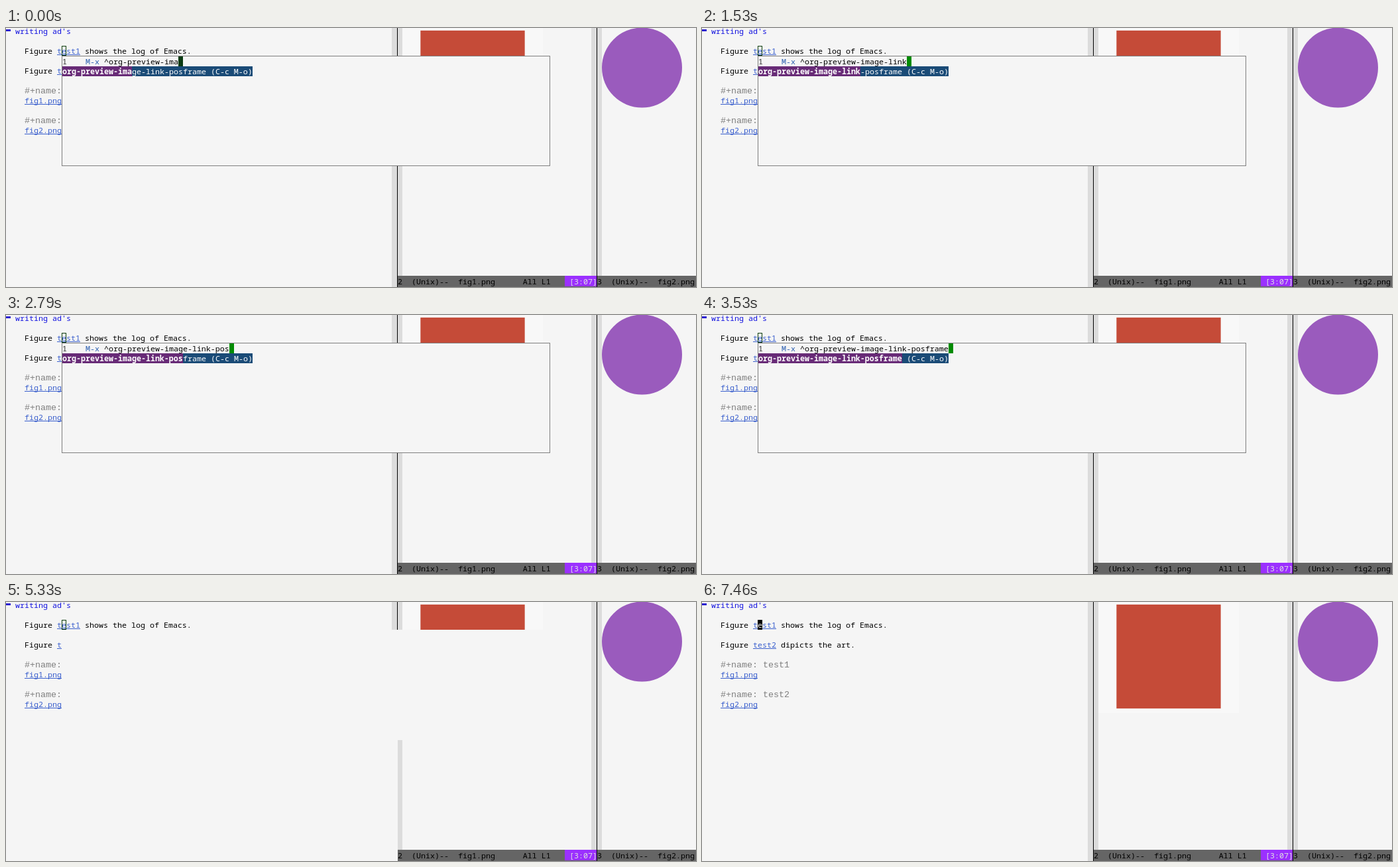
An HTML page with a canvas for the animation above (8000 ms loop, 1041 px wide and 392 px high).

```html
<!DOCTYPE html>
<html lang="en">
<head>
<meta charset="utf-8">
<title>Image link preview</title>
<style>
html, body { margin: 0; width: 100%; height: 100%; overflow: hidden; background: #f5f5f5; }
canvas { display: block; width: 1041px; height: 392px; }
</style>
</head>
<body>
<canvas id="stage" width="1041" height="392"></canvas>
<script>
const ctx = document.getElementById('stage').getContext('2d');
const LOOP = 8000, CELL = 7;
const PAPER = '#f5f5f5', FRINGE = '#dcdcdc', LINK = '#3a5fcd', RED = '#c54b38';
const MONO = '11.667px "Noto Sans Mono", monospace';
const WIDE = '13.333px "Liberation Mono", monospace';

const COMMAND = 'org-preview-image-link-posframe';
const START_CHARS = 15;
const KEY_TIMES = [200, 270, 530, 1060, 1200, 1400, 1530, 1930, 2200, 2330, 2790,
                   3060, 3190, 3330, 3430, 3530];
const PROMPT_CLOSED = 4920, FRAME_OPEN = 5330, IMAGE_SHOWN = 5670, FRAME_CLOSED = 7460;

function rect(x, y, w, h, color) {
  ctx.fillStyle = color;
  ctx.fillRect(x, y, w, h);
}

function text(str, x, y, color = '#000', font = MONO) {
  ctx.font = font;
  ctx.fillStyle = color;
  ctx.fillText(str, x, y);
}

function outline(x, y, w, h, color) {
  ctx.strokeStyle = color;
  ctx.lineWidth = 1;
  ctx.strokeRect(x + 0.5, y + 0.5, w - 1, h - 1);
}

function link(str, x, y) {
  text(str, x, y, LINK);
  rect(x, y + 1, str.length * CELL, 1, LINK);
}

// Picture tile with a plain square standing for the artwork
function tile(x, y, w, h) {
  rect(x, y, w, h, '#f8f8f8');
  const side = h * 0.92;
  rect(x + (w - side) / 2, y + (h - side) / 2, side, side, RED);
}

function drawDocument(focused) {
  rect(0, 2, 7, 3, '#2a1fd0');
  text("writing ad's", 14, 9, '#1414e0');

  text('Figure', 28, 39);
  link('test1', 77, 39);
  text('shows the log of Emacs.', 119, 39);
  text('Figure', 28, 69);
  link('test2', 77, 69);
  text('dipicts the art.', 119, 69);

  for (const n of [1, 2]) {
    const y = 54 + n * 45;
    text('#+name: test' + n, 28, y, '#7f7f7f', WIDE);
    link(`fig${n}.png`, 28, y + 15);
  }

  if (focused) {
    rect(84, 27, 7, 15, '#000');
    text('e', 84, 39, PAPER);
  } else {
    outline(84, 27, 7, 15, '#0b3d0b');
  }
}

function drawDivider(x) {
  rect(x - 8, 0, 16, 392, FRINGE);
  rect(x, 0, 1, 392, '#000');
}

function drawPanes() {
  drawDivider(590);
  drawDivider(891);
  tile(598, -3, 212, 171);

  ctx.fillStyle = '#9a5bbd';
  ctx.beginPath();
  ctx.arc(959.5, 60, 60.5, 0, Math.PI * 2);
  ctx.fill();

  rect(591, 375, 450, 17, '#656565');
  text('2  (Unix)--  fig1.png      All L1', 591, 388);
  rect(843, 375, 48, 16, '#9b30ff');
  text('[3:07]', 850, 388, '#e0e0e0');
  rect(891, 375, 1, 17, '#000');
  text('3  (Unix)--  fig2.png', 892, 388);
}

function drawPrompt(t) {
  const count = START_CHARS + KEY_TIMES.filter(k => k <= t).length;
  const typed = COMMAND.slice(0, count);
  outline(84, 42, 737, 167, '#7f7f7f');

  text('1', 85, 55, '#333');
  text('M-x', 120, 55, '#2a5db0');
  text('^' + typed, 148, 55);
  rect(155 + count * CELL, 43, CELL, 15, t < KEY_TIMES[0] ? '#0a3a12' : '#008b00');

  const split = 85 + count * CELL;
  rect(85, 58, 287, 15, '#1a4b77');
  rect(85, 58, count * CELL, 15, '#682b77');
  text(typed, 85, 70, '#fff', 'bold ' + MONO);
  text(COMMAND.slice(count) + ' (C-c M-o)', split, 70, '#fff');
}

function draw(t) {
  rect(0, 0, 1041, 392, PAPER);
  drawDocument(t >= IMAGE_SHOWN);
  drawPanes();

  if (t < IMAGE_SHOWN) rect(84, 42, 737, 167, PAPER);
  if (t < PROMPT_CLOSED) {
    drawPrompt(t);
  } else if (t >= FRAME_OPEN && t < IMAGE_SHOWN) {
    rect(84, 42, 507, 350, PAPER);
  } else if (t >= IMAGE_SHOWN && t < FRAME_CLOSED) {
    tile(84, 42, 300, 242);
  }
}

const start = performance.now();
function tick() {
  draw((performance.now() - start) % LOOP);
  requestAnimationFrame(tick);
}
tick();
</script>
</body>
</html>
```
